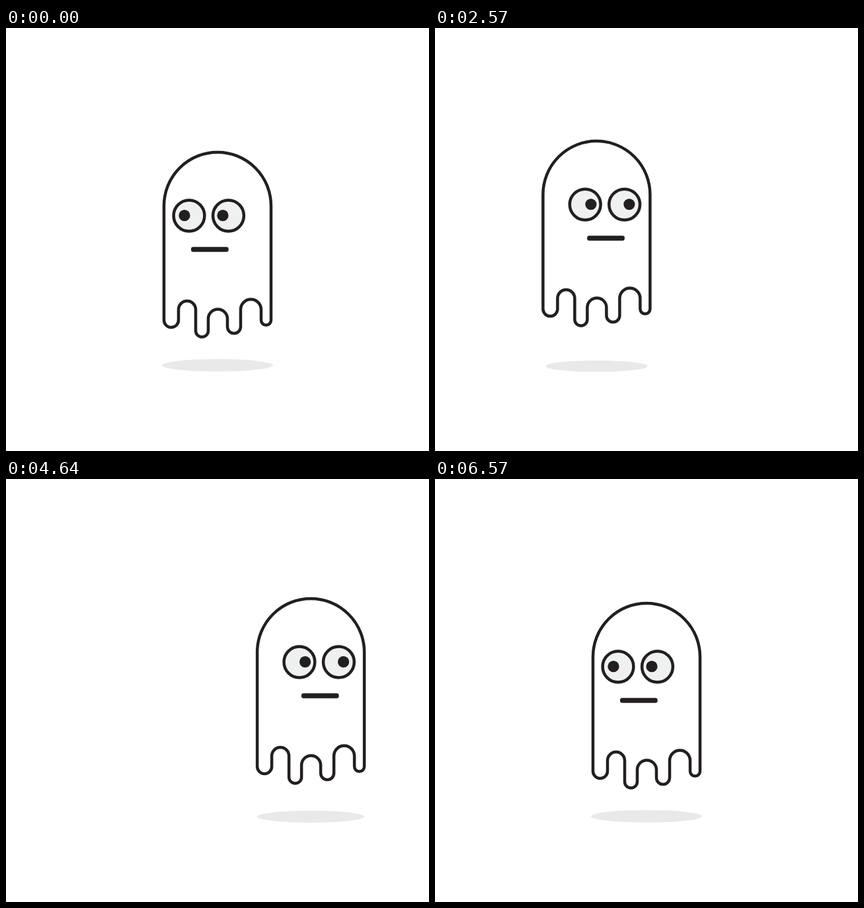
These frames come from a looping animation (640x640 px, 6.64 s). An HTML page:

```html
<!DOCTYPE html>
<html lang="en">
<head>
<meta charset="utf-8">
<title>Floating ghost</title>
<style>
  html, body { margin: 0; width: 100%; height: 100%; overflow: hidden; background: #fff; }
  svg { display: block; width: 100vw; height: 100vh; }
  .line { stroke: #231f20; stroke-width: 4.5; stroke-linejoin: round; }
  .ink { fill: #231f20; }
  .eye { fill: #eff1f0; }
</style>
</head>
<body>
<svg viewBox="0 0 640 640">
  <ellipse id="shadow" fill="#e9e9e9"/>
  <!-- x is measured from the middle of the body -->
  <g id="ghost">
    <path class="line" fill="#fff" d="M-81 269 A81 81 0 0 1 81 269
      V442 A7.5 7.5 0 0 1 66 442 V426 A15.5 15.5 0 0 0 35 426
      V452 A10 10 0 0 1 15 452 V440 A14.5 14.5 0 0 0 -14 440
      V458 A9.5 9.5 0 0 1 -33 458 V426 A13 13 0 0 0 -59 426
      V442 A11 11 0 0 1 -81 442 Z"/>
    <g id="face">
      <circle class="line eye" cx="-43" cy="284" r="23.4"/>
      <circle class="line eye" cx="16.5" cy="284" r="23.4"/>
      <rect class="ink" x="-40" y="331.3" width="56.7" height="7.4" rx="3.2"/>
    </g>
    <g id="pupils" class="ink">
      <circle cx="-50" cy="283.7" r="8.6"/>
      <circle cx="8" cy="283.7" r="8.6"/>
    </g>
  </g>
</svg>
<script>
const LOOP = 6640, STEP = 71.4;
const LEFT_TURN = 20, RIGHT_TURN = 65, TURN_STEPS = 5;
const FACE_SHIFT = 25.8, PUPIL_SHIFT = 41.5;

// [step, value]
const DRIFT = [[0, 320], [10, 253.5], [11, 246.3], [20, 184.7], [24, 157.5],
  [27, 177], [30, 198.5], [40, 275], [44, 305], [50, 352], [55, 390.5],
  [60, 428.5], [68, 480.7], [70, 467.5], [76, 427], [80, 401], [90, 334.5], [92, 320]];
const BOB = [[0, 0], [5, 4], [10, 5.8], [11, 5.3], [20, 0.7], [24, 2], [27, 1.5],
  [30, -6.5], [35, -15], [39, -22.5], [40, -20.5], [44, -3.4], [50, 19.5],
  [55, 11], [60, 5.5], [65, -7], [70, -18.5], [73, -17.5], [76, -15],
  [80, -21.5], [85, -14], [90, -3.5], [92, 0]];

const [shadow, ghost, face, pupils] =
  ["shadow", "ghost", "face", "pupils"].map(id => document.getElementById(id));

const segment = (table, s) => {
  let i = 0;
  while (i < table.length - 2 && table[i + 1][0] <= s) i++;
  return i;
};

function linear(table, s) {
  const i = segment(table, s);
  const [t0, v0] = table[i], [t1, v1] = table[i + 1];
  return v0 + (v1 - v0) * (s - t0) / (t1 - t0);
}

function smooth(table, s) {
  const i = segment(table, s);
  const [t0, v0] = table[i], [t1, v1] = table[i + 1];
  const slope = k => {
    const a = table[Math.max(k - 1, 0)], b = table[Math.min(k + 1, table.length - 1)];
    return (b[1] - a[1]) / (b[0] - a[0]);
  };
  const h = t1 - t0, u = (s - t0) / h, r = 1 - u;
  return v0 * (1 + 2 * u) * r * r + slope(i) * h * u * r * r
       + v1 * u * u * (3 - 2 * u) - slope(i + 1) * h * u * u * r;
}

function ramp(s, start) {
  const u = Math.min(1, Math.max(0, (s - start) / TURN_STEPS));
  return u * u * (3 - 2 * u);
}

const move = (el, x, y = 0) => el.setAttribute("transform", `translate(${x} ${y})`);

function draw(time) {
  const s = Math.min(92, Math.floor((time % LOOP) / STEP + 0.1));
  const x = linear(DRIFT, s), y = smooth(BOB, s);
  const look = ramp(s, LEFT_TURN) - ramp(s, RIGHT_TURN);
  const rx = 84 + 0.41 * y;

  move(ghost, x, y);
  move(face, FACE_SHIFT * look);
  move(pupils, PUPIL_SHIFT * look);
  pupils.style.visibility = s >= 10 && s <= 12 ? "hidden" : "visible";

  shadow.setAttribute("cx", x);
  shadow.setAttribute("cy", 510.3 - 0.08 * y);
  shadow.setAttribute("rx", rx);
  shadow.setAttribute("ry", rx * 0.112);
}

let begin;
function tick(now) {
  begin ??= now;
  draw(now - begin);
  requestAnimationFrame(tick);
}
draw(0);
requestAnimationFrame(tick);
</script>
</body>
</html>
```
